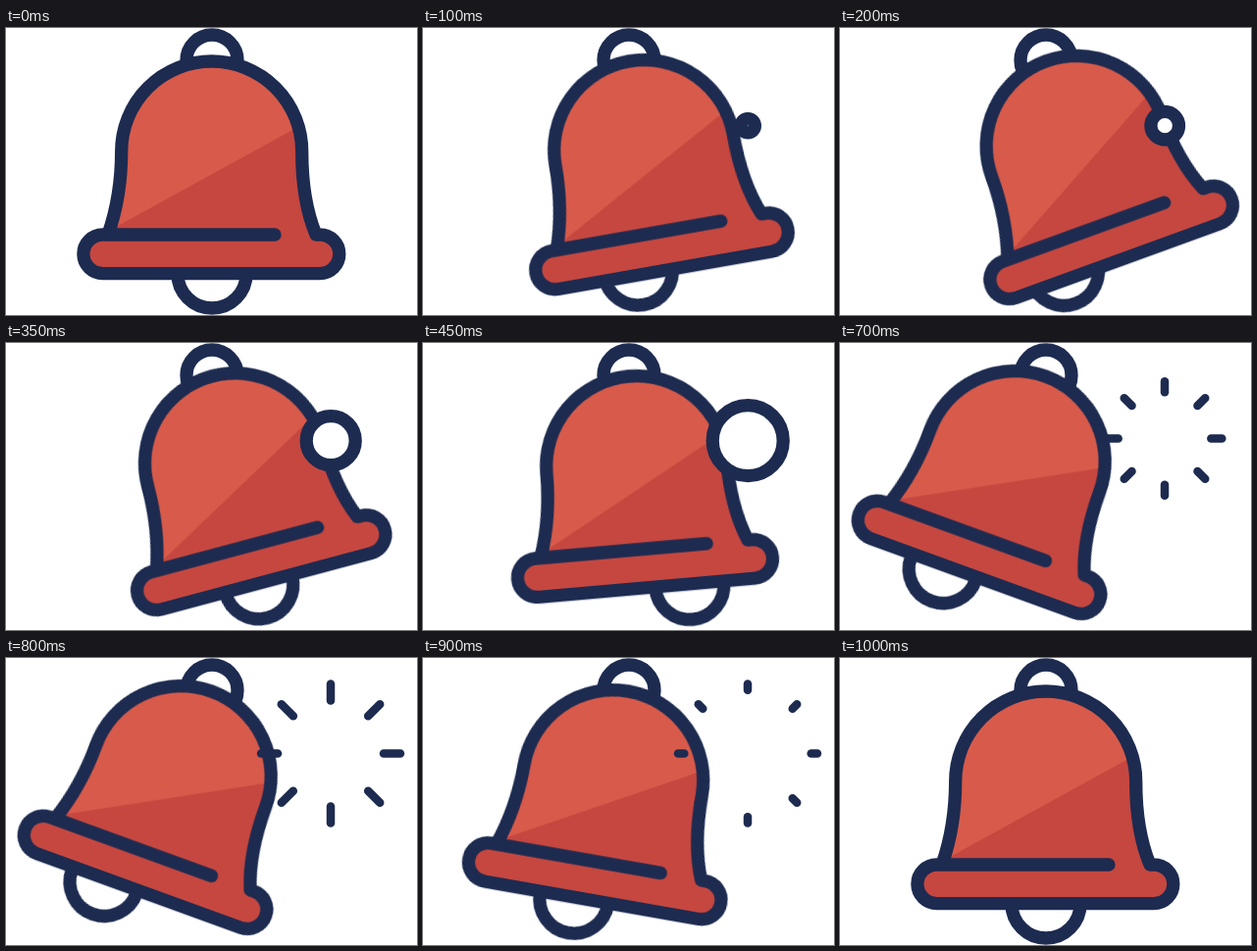
Recreate the animation shown at these times as an HTML page. Size 419 px wide and 293 px high, loop 1050 ms.

```html
<!DOCTYPE html>
<html lang="en">
<head>
<meta charset="utf-8">
<title>Ringing bell</title>
<style>
  html, body { margin: 0; width: 100%; height: 100%; overflow: hidden; background: #fff; }
  svg { display: block; width: 419px; height: 293px; }
  .line { stroke: #1d2b50; stroke-width: 13.3; stroke-linecap: round; stroke-linejoin: round; }
  .white { fill: #fff; }

  /* The picture moves in steps of 50 ms; the short delay keeps samples off the step edges. */
  #bell, #clapper, #ring, #sparks line { animation: 1050ms -1ms infinite; }

  #bell { animation-name: swing; transform-origin: 209.5px 34px; }
  @keyframes swing {
    0% { transform: rotate(0deg); animation-timing-function: steps(5); }
    23.81% { transform: rotate(-25deg); animation-timing-function: steps(10); }
    71.43% { transform: rotate(25deg); animation-timing-function: steps(5); }
    95.24%, 100% { transform: rotate(0deg); }
  }

  #clapper { animation-name: clap; }
  @keyframes clap {
    0% { transform: translate(0px, 0px); animation-timing-function: steps(4); }
    19.05% { transform: translate(-56px, -9px); animation-timing-function: steps(3); }
    33.33% { transform: translate(-9px, 1px); animation-timing-function: steps(2); }
    42.86% { transform: translate(43px, 1px); animation-timing-function: steps(6); }
    71.43% { transform: translate(-46px, 4px); animation-timing-function: steps(5); }
    95.24%, 100% { transform: translate(0px, 0px); }
  }

  #ring { animation-name: grow; }
  @keyframes grow {
    0% { r: 0px; animation-timing-function: steps(7); }
    33.33% { r: 25px; animation-timing-function: steps(5); }
    57.14% { r: 52.5px; animation-timing-function: steps(1); }
    61.9%, 100% { r: 0px; }
  }

  #sparks line { stroke: #1d2b50; stroke-width: 8.5; stroke-linecap: round; animation-name: burst; }
  @keyframes burst {
    0% { visibility: hidden; animation-timing-function: steps(1); }
    61.9% { visibility: visible; stroke-dasharray: 8 99; stroke-dashoffset: 0; animation-timing-function: steps(3); }
    76.19% { visibility: visible; stroke-dasharray: 17 99; stroke-dashoffset: -10; animation-timing-function: steps(3); }
    90.48%, 100% { visibility: hidden; stroke-dasharray: 1 99; stroke-dashoffset: -26; }
  }
</style>
</head>
<body>
<svg viewBox="0 0 419 293">
  <defs>
    <path id="body" d="M274 211 H98.7 a19.8 19.8 0 0 0 0 39.6 H320 a19.8 19.8 0 0 0 0 -39.6 H316
      C306 187 301.7 160 301.7 126 A92 92 0 0 0 117.7 126 C117.7 160 113 185 104 211"/>
    <clipPath id="inside"><use href="#body"/></clipPath>
  </defs>
  <circle class="line white" cx="210" cy="33" r="26"/>
  <g id="bell">
    <circle id="clapper" class="line white" cx="210" cy="251" r="35"/>
    <use href="#body" fill="#d85a4a"/>
    <path clip-path="url(#inside)" fill="#c54740" d="M60 207.5 H104 L360 66.7 V260 H60 Z"/>
    <use href="#body" class="line" fill="none"/>
  </g>
  <circle id="ring" class="line white" cx="331.2" cy="99.7"/>
  <g id="sparks" transform="translate(331 97.5)"></g>
</svg>
<script>
  const sparks = document.getElementById('sparks');
  for (let angle = 0; angle < 360; angle += 45) {
    const ray = document.createElementNS('http://www.w3.org/2000/svg', 'line');
    ray.setAttribute('x1', 44);
    ray.setAttribute('x2', 71);
    ray.setAttribute('transform', `rotate(${angle})`);
    sparks.append(ray);
  }
</script>
</body>
</html>
```
